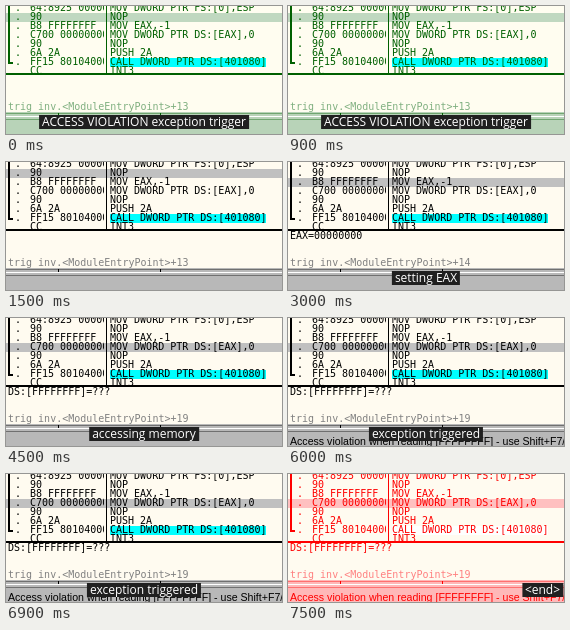
An HTML page for the animation above (8000 ms loop, 276 by 128 pixels).

```html
<!DOCTYPE html>
<html lang="en">
<head>
<meta charset="utf-8">
<title>Access violation trigger</title>
<style>
  html, body { margin: 0; width: 100%; height: 100%; overflow: hidden; }
  #stage { position: relative; width: 276px; height: 128px; overflow: hidden; isolation: isolate; background: #fffbf0; }
  svg, #tint { position: absolute; left: 0; top: 0; width: 276px; height: 128px; }
  text { font: 10px "DejaVu Sans Mono", monospace; white-space: pre; }
  #status { font: 10.6px "Liberation Sans", sans-serif; }
  #tint { mix-blend-mode: screen; }
  #caption {
    position: absolute; top: 109px; height: 14px; padding: 0 3px;
    transform: translateX(-50%); white-space: nowrap;
    font: 12px/14px "Open Sans", sans-serif; color: #fff; background: #202020;
  }
</style>
</head>
<body>
<div id="stage">
  <svg viewBox="0 0 276 128">
    <defs>
      <clipPath id="codePane"><rect width="276" height="67"/></clipPath>
      <clipPath id="bytesColumn"><rect width="98" height="67"/></clipPath>
    </defs>
    <g clip-path="url(#codePane)">
      <rect id="cursor" width="276" height="9" fill="#c0c0c0"/>
      <rect x="104" y="52" width="156" height="9" fill="#0ff"/>
      <path d="M3 0V57H7" fill="none" stroke="#000" stroke-width="2"/>
      <path d="M100.5 0V67" stroke="#000"/>
      <g id="bytes" clip-path="url(#bytesColumn)"></g>
      <g id="commands"></g>
    </g>
    <rect y="67" width="276" height="2" fill="#000"/>
    <text id="info" x="2" y="77"></text>
    <text id="location" x="2" y="104" fill="#808080"></text>
    <rect y="106" width="276" height="22" fill="#b8b8b8"/>
    <path d="M0 107.5H276M0 113.5H276" stroke="#707070"/>
    <path d="M0 110.5H276" stroke="#fff"/>
    <path d="M52.5 107V110M154.5 107V110" stroke="#000"/>
    <text id="status" x="2" y="127"></text>
  </svg>
  <div id="tint"></div>
  <div id="caption"></div>
</div>
<script>
const ROW_HEIGHT = 9, FIRST_ROW = -2, STEP = 1500, LOOP = 8000;
const byId = id => document.getElementById(id);

const listing = [
  ["64:8925 00000000", "MOV DWORD PTR FS:[0],ESP"],
  ["90", "NOP"],
  ["B8 FFFFFFFF", "MOV EAX,-1"],
  ["C700 00000000", "MOV DWORD PTR DS:[EAX],0"],
  ["90", "NOP"],
  ["6A 2A", "PUSH 2A"],
  ["FF15 80104000", "CALL DWORD PTR DS:[401080]"],
  ["CC", "INT3"],
];
const violation = "Access violation when reading [FFFFFFFF] - use Shift+F7/F8/F9 to pass exception to program";
const fault = { row: 3, offset: 19, info: "DS:[FFFFFFFF]=???" };
const scenes = [
  { row: 1, offset: 13, caption: "ACCESS VIOLATION exception trigger", tint: "#006000" },
  { row: 1, offset: 13 },
  { row: 2, offset: 14, info: "EAX=00000000", caption: "setting EAX" },
  { ...fault, caption: "accessing memory" },
  { ...fault, caption: "exception triggered", status: violation },
  { ...fault, caption: "<end>", center: 254.5, status: violation, tint: "#f00" },
];

function addText(parent, x, y, content) {
  const text = document.createElementNS("http://www.w3.org/2000/svg", "text");
  text.setAttribute("x", x);
  text.setAttribute("y", y);
  text.textContent = content;
  byId(parent).append(text);
}

listing.forEach(([bytes, command], i) => {
  const baseline = FIRST_ROW + i * ROW_HEIGHT + 7;
  if (i < 7) addText("bytes", 9, baseline, ".");
  addText("bytes", 24, baseline, bytes);
  addText("commands", 104, baseline, command);
});

function show({ row, offset, info = "", caption = "", center = 138, status = "", tint = "#000" }) {
  byId("cursor").setAttribute("y", FIRST_ROW + row * ROW_HEIGHT);
  byId("info").textContent = info;
  byId("location").textContent = `trig_inv.<ModuleEntryPoint>+${offset}`;
  byId("status").textContent = status;
  byId("tint").style.background = tint;
  const label = byId("caption");
  label.textContent = caption;
  label.hidden = !caption;
  label.style.left = center + "px";
}

let start, current;
function tick(now) {
  start ??= now;
  const index = Math.floor(((now - start) % LOOP) / STEP);
  if (index !== current) show(scenes[current = index]);
  requestAnimationFrame(tick);
}
show(scenes[0]);
requestAnimationFrame(tick);
</script>
</body>
</html>
```
